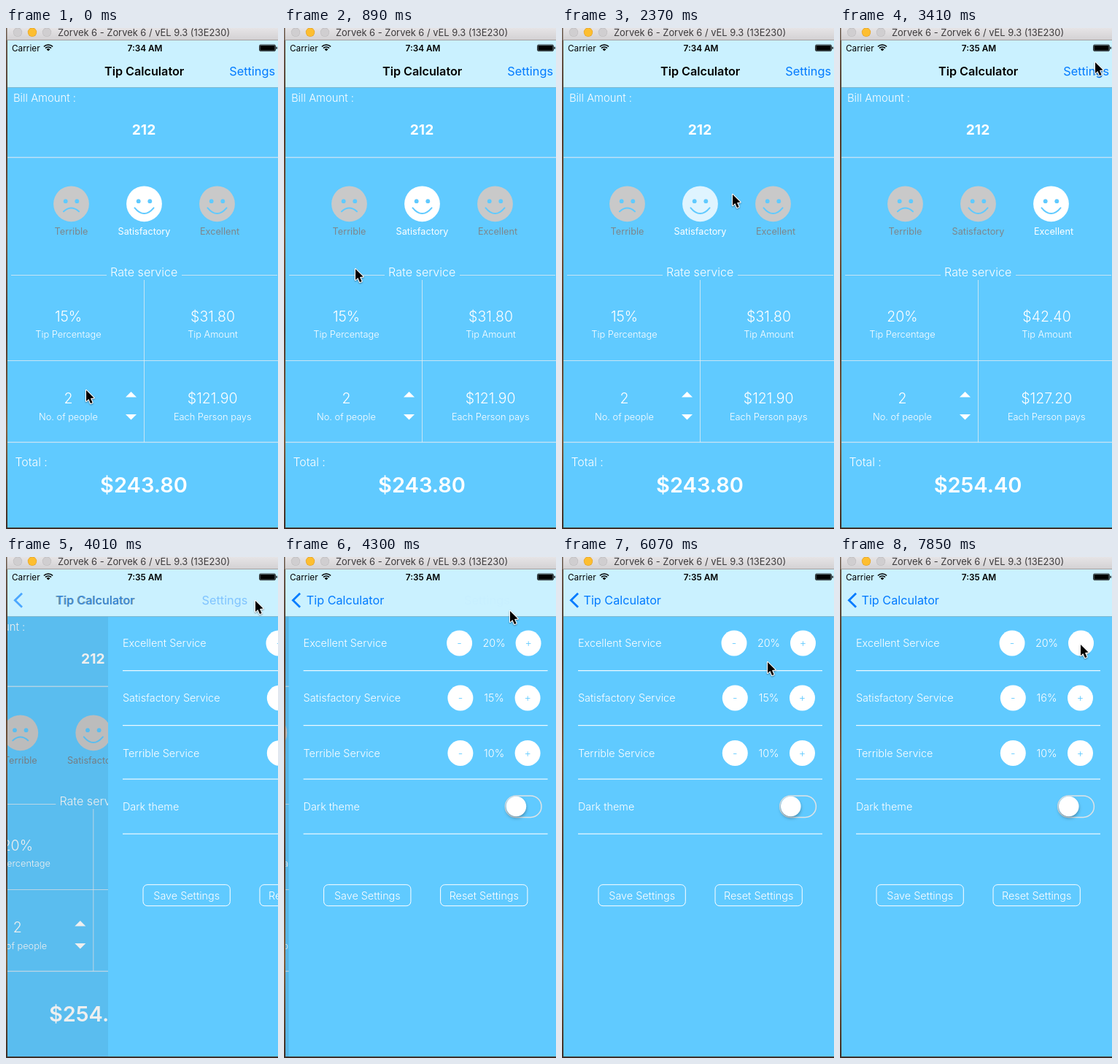
Write an HTML page with a canvas that moves like this. It is 373 px wide and 686 px high and loops after 8 s.

```html
<!DOCTYPE html>
<html lang="en">
<head>
<meta charset="utf-8">
<title>Tip Calculator</title>
<style>
  html, body { margin: 0; width: 100%; height: 100%; overflow: hidden; }
  canvas { display: block; width: 373px; height: 686px; }
</style>
</head>
<body>
<canvas id="stage"></canvas>
<script>
const W = 373, H = 686, LOOP = 8000, STEP = 148.3;
const SKY = '#60caff', NAV = '#caf1ff', LINK = '#007aff', GREY = '#c9c9c9';
const LINE = 'rgba(232,236,240,.75)';
const BILL = 212, PEOPLE = 2;

const canvas = document.getElementById('stage');
const dpr = window.devicePixelRatio || 1;
canvas.width = W * dpr;
canvas.height = H * dpr;
const ctx = canvas.getContext('2d');

// Pointer path: step, x, y
const PATH = [
  [0, 110, 496], [1, 130, 500], [2, 161, 509], [3, 156, 500], [5, 118, 385],
  [7, 78, 275], [8, 74, 255], [9, 72, 264], [10, 58, 324], [11, 50, 325],
  [12, 90, 290], [13, 165, 250], [14, 186, 245], [15, 200, 238], [16, 234, 228],
  [18, 282, 244], [19, 284, 246], [20, 300, 225], [21, 330, 130], [22, 350, 60],
  [23, 350, 47], [25, 350, 52], [27, 342, 60], [29, 310, 74], [30, 309, 78],
  [32, 305, 140], [34, 303, 220], [35, 285, 270], [37, 248, 289], [39, 276, 195],
  [40, 282, 150], [41, 282, 144], [43, 240, 180], [44, 238, 187], [46, 308, 189],
  [47, 327, 188], [49, 328, 191], [51, 322, 160], [52, 329, 125], [53, 330, 120]
];

// Service choices: step, face index
const CHOICES = [[-9, 1], [10, 0], [15, 1], [19, 2]];
const FACES = [
  { label: 'Terrible', x: 89.5, rate: 10 },
  { label: 'Satisfactory', x: 189.5, rate: 15 },
  { label: 'Excellent', x: 289.5, rate: 20 }
];

function text(str, x, y, size, weight = 400, color = '#fff', align = 'left') {
  ctx.font = `${weight} ${size}px Inter, "Open Sans", sans-serif`;
  ctx.fillStyle = color;
  ctx.textAlign = align;
  ctx.fillText(str, x, y);
}

function centered(str, x, y, size, weight = 300, color = '#fff') {
  text(str, x, y, size, weight, color, 'center');
}

function rect(x, y, w, h, color) {
  ctx.fillStyle = color;
  ctx.fillRect(x, y, w, h);
}

function disc(x, y, r, color) {
  ctx.fillStyle = color;
  ctx.beginPath();
  ctx.arc(x, y, r, 0, 7);
  ctx.fill();
}

function poly(points, color) {
  ctx.beginPath();
  points.forEach(([x, y]) => ctx.lineTo(x, y));
  ctx.closePath();
  ctx.fillStyle = color;
  ctx.fill();
}

function outline(x, y, w, h, r, color, width) {
  ctx.beginPath();
  ctx.roundRect(x, y, w, h, r);
  ctx.strokeStyle = color;
  ctx.lineWidth = width;
  ctx.stroke();
}

function pointerAt(step) {
  const n = Math.max(1, PATH.findIndex(p => p[0] >= step));
  const [a, ax, ay] = PATH[n - 1], [b, bx, by] = PATH[n];
  const k = (step - a) / (b - a);
  return [ax + (bx - ax) * k, ay + (by - ay) * k];
}

function drawPointer(step) {
  const [x, y] = pointerAt(step);
  ctx.save();
  ctx.translate(x, y);
  ctx.beginPath();
  [[0, 0], [0, 15], [3.4, 12], [6, 18], [8.6, 17], [6, 11], [10.6, 10.6]]
    .forEach(([px, py]) => ctx.lineTo(px, py));
  ctx.closePath();
  ctx.lineJoin = 'round';
  ctx.lineWidth = 2.2;
  ctx.strokeStyle = '#fff';
  ctx.shadowColor = 'rgba(0,0,0,.4)';
  ctx.shadowBlur = 2 * dpr;
  ctx.shadowOffsetY = dpr;
  ctx.stroke();
  ctx.shadowColor = 'transparent';
  ctx.fillStyle = '#000';
  ctx.fill();
  ctx.restore();
}

function drawFace(face, sad, color, labelColor) {
  const { x, label } = face, y = 240.8;
  disc(x, y, 24.4, color);
  disc(x - 7.8, y - 3.6, 2.9, SKY);
  disc(x + 7.8, y - 3.6, 2.9, SKY);
  ctx.beginPath();
  if (sad) {
    ctx.moveTo(x - 10.5, y + 10.5);
    ctx.quadraticCurveTo(x, y + 1, x + 10.5, y + 10.5);
  } else {
    ctx.moveTo(x - 13, y + 5.5);
    ctx.quadraticCurveTo(x, y + 21, x + 13, y + 5.5);
  }
  ctx.strokeStyle = SKY;
  ctx.lineWidth = 2;
  ctx.lineCap = 'round';
  ctx.stroke();
  ctx.lineCap = 'butt';
  centered(label, x + (label === 'Excellent' ? 3.5 : 0), 283, 12.7, 400, labelColor);
}

function drawCalculator(step) {
  rect(2, 81, W - 2, 603, SKY);
  const [since, chosen] = CHOICES.filter(c => c[0] <= step).pop();
  const glow = [.5, .8][step - since] || 1;
  const rate = FACES[chosen].rate;
  const tip = BILL * rate / 100, total = BILL + tip;
  const money = v => '$' + v.toFixed(2);

  text('Bill Amount :', 10, 100.5, 14.8, 300);
  centered(String(BILL), 189, 145.6, 19.2, 700);
  rect(2, 176.6, W - 2, 1.3, LINE);

  FACES.forEach((face, n) => {
    const on = n === chosen;
    drawFace(face, n === 0, on ? `rgba(255,255,255,${glow})` : GREY, on ? '#fff' : '#7d868c');
  });

  rect(7, 338, 131, 1, LINE);
  rect(241, 338, 131, 1, LINE);
  centered('Rate service', 189.2, 339.5, 16.1);
  rect(189, 345, 1, 222, LINE);
  rect(2, 455, W - 2, 1, LINE);
  rect(2, 566.6, W - 2, 1.3, LINE);

  const cells = [
    [85.5, 401.6, rate + '%', 'Tip Percentage'],
    [283.5, 401.6, money(tip), 'Tip Amount'],
    [85.5, 514, String(PEOPLE), 'No. of people'],
    [283.2, 514, money(total / PEOPLE), 'Each Person pays']
  ];
  for (const [x, y, value, caption] of cells) {
    centered(value, x, y, 19.5);
    centered(caption, x, y + 22.6, 12.8);
  }
  poly([[164, 505.5], [171.5, 498], [179, 505.5]], '#fff');
  poly([[164, 529], [171.5, 536.5], [179, 529]], '#fff');

  text('Total :', 12.5, 599.6, 15.8, 300);
  centered(money(total), 189, 636, 29, 600);
}

function drawSettings(step) {
  rect(2, 81, W - 2, 603, SKY);
  const rows = [
    ['Excellent Service', 20, 118, 236, 330.5, 155],
    ['Satisfactory Service', step < 49 ? 15 : 16, 193, 237.3, 329.5, 230],
    ['Terrible Service', 10, 268.5, 237.3, 329.5, 303.5]
  ];
  const pressed = { 48: 1, 53: 0 }[step];
  rows.forEach(([label, rate, y, minus, plus, base], n) => {
    text(label, 22, y + 5.4, 14.4, 300);
    disc(minus, y, 17.5, '#fff');
    disc(plus, y, 17.5, '#fff');
    centered('-', minus, y + 5, 14.4, 300, SKY);
    if (n !== pressed) centered('+', plus, y + 5, 14.4, 300, SKY);
    centered(rate + '%', 283.5, y + 5.4, 14.4);
    rect(22, base, 335, 1.2, 'rgba(255,255,255,.9)');
  });

  text('Dark theme', 22, 347, 14.4, 300);
  rect(22, 378.5, 335, 1.2, 'rgba(255,255,255,.9)');
  outline(298.8, 327, 49.6, 29.4, 14.7, '#dfe3e6', 1.5);
  ctx.save();
  ctx.shadowColor = 'rgba(0,0,0,.3)';
  ctx.shadowBlur = 4 * dpr;
  ctx.shadowOffsetY = 2.5 * dpr;
  disc(313.8, 341.5, 13.8, '#fff');
  ctx.restore();

  [['Save Settings', 50], ['Reset Settings', 210]].forEach(([label, x]) => {
    outline(x, 448.7, 119.3, 29, 6, '#fff', 1);
    centered(label, x + 59.7, 468.5, 14.4);
  });
}

function drawNav(step, slide) {
  rect(2, 17, W - 2, 64, NAV);
  rect(2, 81, W - 2, .8, '#86b4c6');

  text('Carrier', 8, 31.5, 11.8, 400, '#000');
  centered(step < 20 ? '7:34 AM' : '7:35 AM', 190.5, 31.5, 11.8, 600, '#000');
  ctx.strokeStyle = '#000';
  ctx.lineWidth = 1.7;
  for (const r of [5.6, 8.6]) {
    ctx.beginPath();
    ctx.arc(58, 31.6, r, -Math.PI * .75, -Math.PI * .25);
    ctx.stroke();
  }
  ctx.beginPath();
  ctx.moveTo(58, 31.6);
  ctx.arc(58, 31.6, 3.4, -Math.PI * .75, -Math.PI * .25);
  ctx.fillStyle = '#000';
  ctx.fill();
  outline(347.5, 23, 22, 8.6, 1.6, '#000', .8);
  rect(348.3, 23.8, 20.4, 7, '#000');
  rect(370.5, 25.8, 1.3, 3, '#000');

  const done = 1 - slide;
  ctx.save();
  if (slide > 0) {
    ctx.globalAlpha = slide;
    centered('Tip Calculator', 189.6 - 107 * done, 65, 16.2, 600, '#000');
    ctx.globalAlpha = slide * (step === 24 || step === 25 ? .3 : 1);
    text('Settings', 369 - 60 * done, 65, 16.3, 400, LINK, 'right');
  }
  if (done > 0) {
    ctx.globalAlpha = done;
    text('Tip Calculator', 29.5 + 107 * slide, 65, 16.2, 400, LINK);
    ctx.beginPath();
    [[22, 49.8], [12.3, 59.3], [22, 68.8]].forEach(([x, y]) => ctx.lineTo(x, y));
    ctx.strokeStyle = LINK;
    ctx.lineWidth = 2.8;
    ctx.lineJoin = 'miter';
    ctx.stroke();
  }
  ctx.restore();
}

function drawDesktop() {
  const wood = ctx.createLinearGradient(0, 0, 0, H);
  ['#6b5a4c', '#4c3a2c', '#76563c', '#4a3a30', '#80603f', '#3c3029']
    .forEach((c, n) => wood.addColorStop(n / 5, c));
  rect(0, 0, W, H, wood);

  const bar = ctx.createLinearGradient(0, 0, 0, 17);
  bar.addColorStop(0, '#e6e4e6');
  bar.addColorStop(1, '#d2d0d2');
  rect(1.5, 0, W, 16.4, bar);
  rect(1.5, 16.2, W, .8, '#aaa8aa');
  [[16, '#d0ced0', '#bebcbe'], [36, '#fdbe30', '#e0a02c'], [56, '#d0ced0', '#bebcbe']]
    .forEach(([x, fill, edge]) => {
      disc(x, 5.8, 6.2, edge);
      disc(x, 5.8, 5.6, fill);
    });
  text('Zorvek 6 - Zorvek 6 / vEL 9.3 (13E230)', 71, 11, 12.9, 400, '#3c3a3c');
}

// Remaining share of the page push, critically damped
function pushLeft(step) {
  const k = Math.max(0, step - 26) * 2.13;
  const left = (1 + k) * Math.exp(-k);
  return left < .003 ? 0 : left;
}

function draw(time) {
  const step = Math.min(53, Math.floor((time % LOOP + 10) / STEP));
  const slide = pushLeft(step);
  ctx.setTransform(dpr, 0, 0, dpr, 0, 0);
  drawDesktop();

  ctx.save();
  ctx.beginPath();
  ctx.rect(2, 17, W - 2, 667);
  ctx.clip();
  if (slide > 0) {
    const done = 1 - slide;
    ctx.save();
    ctx.translate(-111 * done, 0);
    drawCalculator(step);
    ctx.restore();
    rect(2, 81, W - 2, 603, `rgba(0,0,0,${.1 * done})`);
  }
  if (slide < 1) {
    ctx.translate((W - 2) * slide, 0);
    drawSettings(step);
    ctx.translate(-(W - 2) * slide, 0);
  }
  drawNav(step, slide);
  ctx.restore();
  drawPointer(step);
}

const start = performance.now();
function tick() {
  draw(performance.now() - start);
  requestAnimationFrame(tick);
}
tick();
</script>
</body>
</html>
```
